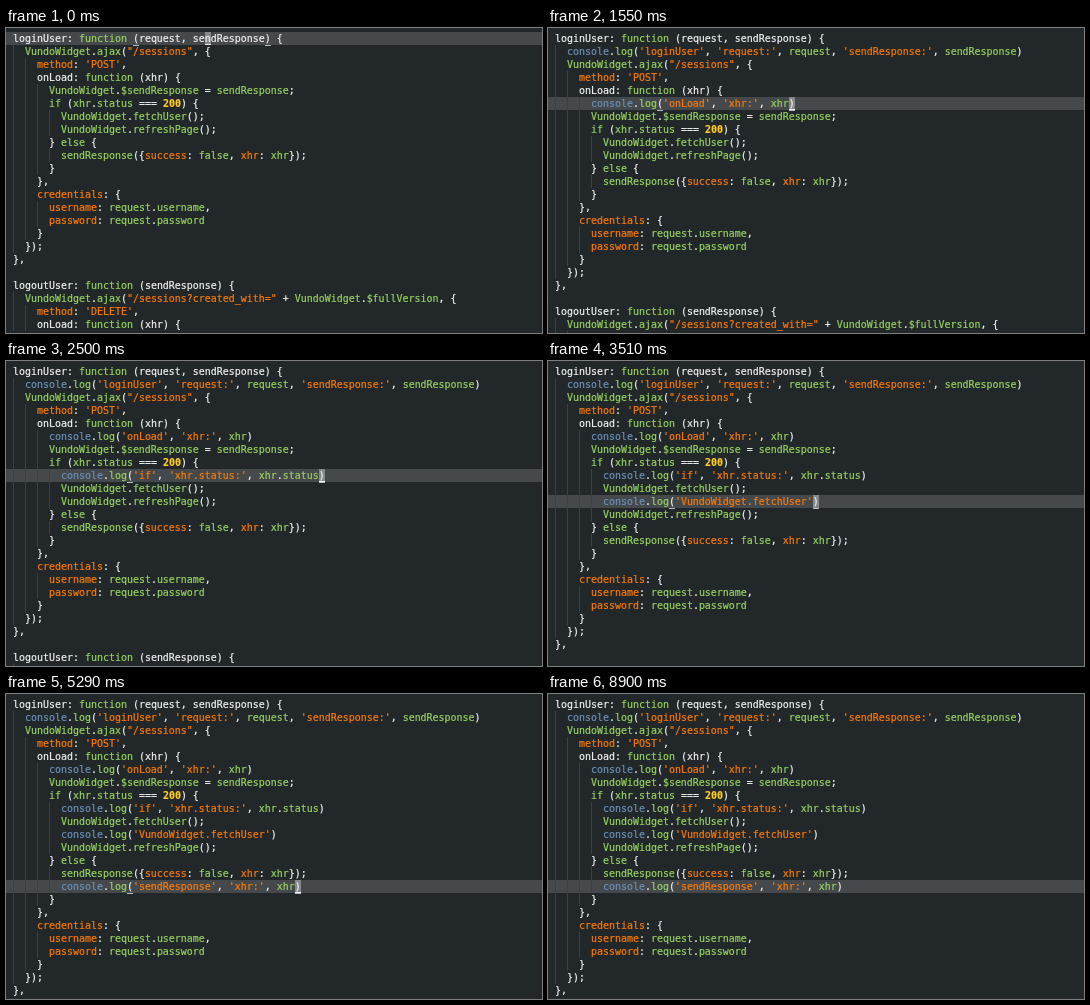
An HTML page for the animation above (9000 ms loop, 536 by 305 pixels).

```html
<!DOCTYPE html>
<html lang="en">
<head>
<meta charset="utf-8">
<title>Logging a function</title>
<style>
  html, body { margin: 0; width: 100%; height: 100%; overflow: hidden; background: #22282a; }
  #stage { position: relative; width: 536px; height: 305px; overflow: hidden; }
  #stage * { position: absolute; }
  pre {
    left: 7px; top: 4px; margin: 0; color: #f1f2f3;
    font: 9.966px/13px "DejaVu Sans Mono", monospace;
    -webkit-text-stroke: .2px;
  }
  #stage span { position: static; }
  .str { color: #ff7a00; }
  .obj { color: #6c90b8; }
  .num { color: #ffcd22; font-weight: bold; }
  .id { color: #97d35f; }
  .line { left: 0 !important; height: 13px; background: #45494c; }
  .guide { height: 13px; background: repeating-linear-gradient(90deg, #3a4144 0 1px, transparent 1px 12px); }
  .caret { height: 13px; background: #85898b; }
  .blink { height: 1px; margin-top: 12px; background: #f1f2f3; }
  .mark { height: 1px; margin-top: 13px; background: #b9bcbd; }
</style>
</head>
<body>
<div id="stage"></div>
<script>
const LOOP = 9000, BLUR = 8900, CHAR = 6, ROW = 13;
const stage = document.getElementById('stage');

const code = `loginUser: function (request, sendResponse) {
  VundoWidget.ajax("/sessions", {
    method: 'POST',
    onLoad: function (xhr) {
      VundoWidget.$sendResponse = sendResponse;
      if (xhr.status === 200) {
        VundoWidget.fetchUser();
        VundoWidget.refreshPage();
      } else {
        sendResponse({success: false, xhr: xhr});
      }
    },
    credentials: {
      username: request.username,
      password: request.password
    }
  });
},

logoutUser: function (sendResponse) {
  VundoWidget.ajax("/sessions?created_with=" + VundoWidget.$fullVersion, {
    method: 'DELETE',
    onLoad: function (xhr) {`;

// Every step moves the caret one row down; some insert a new line there.
const steps = [
  [530, "  console.log('loginUser', 'request:', request, 'sendResponse:', sendResponse)"],
  [830], [950], [1190],
  [1550, "      console.log('onLoad', 'xhr:', xhr)"],
  [1850], [2150],
  [2500, "        console.log('if', 'xhr.status:', xhr.status)"],
  [2800],
  [3040, "        console.log('VundoWidget.fetchUser')"],
  [3600], [3690], [3930],
  [4230, "        console.log('sendResponse', 'xhr:', xhr)"]
];
const toggles = [120, 3510, 4700, 5290, 5710, 6230, 6690, 7230, 7640, 8230, 8640];

const tokens = /(?<str>'.*?'|".*?"|\w+(?=:(?! function)))|(?<fg>\w+(?=:)|(?<=function \([^)]*)\w+)|(?<obj>console)|(?<num>\d+)|(?<id>[\w$]+)/g;

function highlight(text) {
  return text.replace(tokens, (word, ...rest) => {
    const groups = rest.at(-1);
    const kind = Object.keys(groups).find(name => groups[name]);
    return `<span class="${kind}">${word}</span>`;
  });
}

function box(kind, row, col, width = CHAR) {
  return `<i class="${kind}" style="left:${7 + col * CHAR}px;top:${4 + row * ROW}px;width:${width}px"></i>`;
}

// Brackets touching the caret, or else the innermost pair around it.
function findPair(text, pos) {
  const open = [], pairs = [];
  [...text].forEach((char, i) => {
    if ('({'.includes(char)) open.push(i);
    if (')}'.includes(char)) pairs.push([open.pop(), i]);
  });
  return pairs.find(pair => pair.includes(pos))
    || pairs.find(pair => pair.includes(pos - 1))
    || pairs.find(([a, b]) => a < pos && pos < b);
}

function makeState(start, lines, row, want) {
  const text = lines.join('\n');
  const col = Math.min(want, lines[row].length - 1);
  const offset = lines.slice(0, row).join('\n').length + (row ? 1 : 0) + col;
  const marks = findPair(text, offset).map(pos => {
    const before = text.slice(0, pos).split('\n');
    return box('mark', before.length - 1, before.at(-1).length);
  });
  const guides = lines.map((line, i) => box('guide', i, 0, line.search(/\S|$/) * CHAR));
  return {
    start,
    back: box('line', row, 0, 536) + guides.join(''),
    caret: box('caret', row, col),
    text: `<pre>${highlight(text)}</pre>`,
    marks: marks.join(''),
    blink: box('blink', row, col)
  };
}

let lines = code.split('\n'), want = 32;
const states = [makeState(0, lines, 0, want)];
steps.forEach(([time, added], i) => {
  if (added) {
    lines = lines.toSpliced(i + 1, 0, added);
    want = added.length - 1;
  }
  states.push(makeState(time, lines, i + 1, want));
});

let shown = '';
function draw() {
  const time = performance.now() % LOOP;
  const state = states.findLast(s => s.start <= time);
  const lit = toggles.filter(t => t > state.start && t <= time).length % 2 === 0;
  const focused = time < BLUR;
  const html = state.back + (focused ? state.caret : '') + state.text
    + (focused ? state.marks + (lit ? state.blink : '') : '');
  if (html !== shown) stage.innerHTML = shown = html;
  requestAnimationFrame(draw);
}
draw();
</script>
</body>
</html>
```
